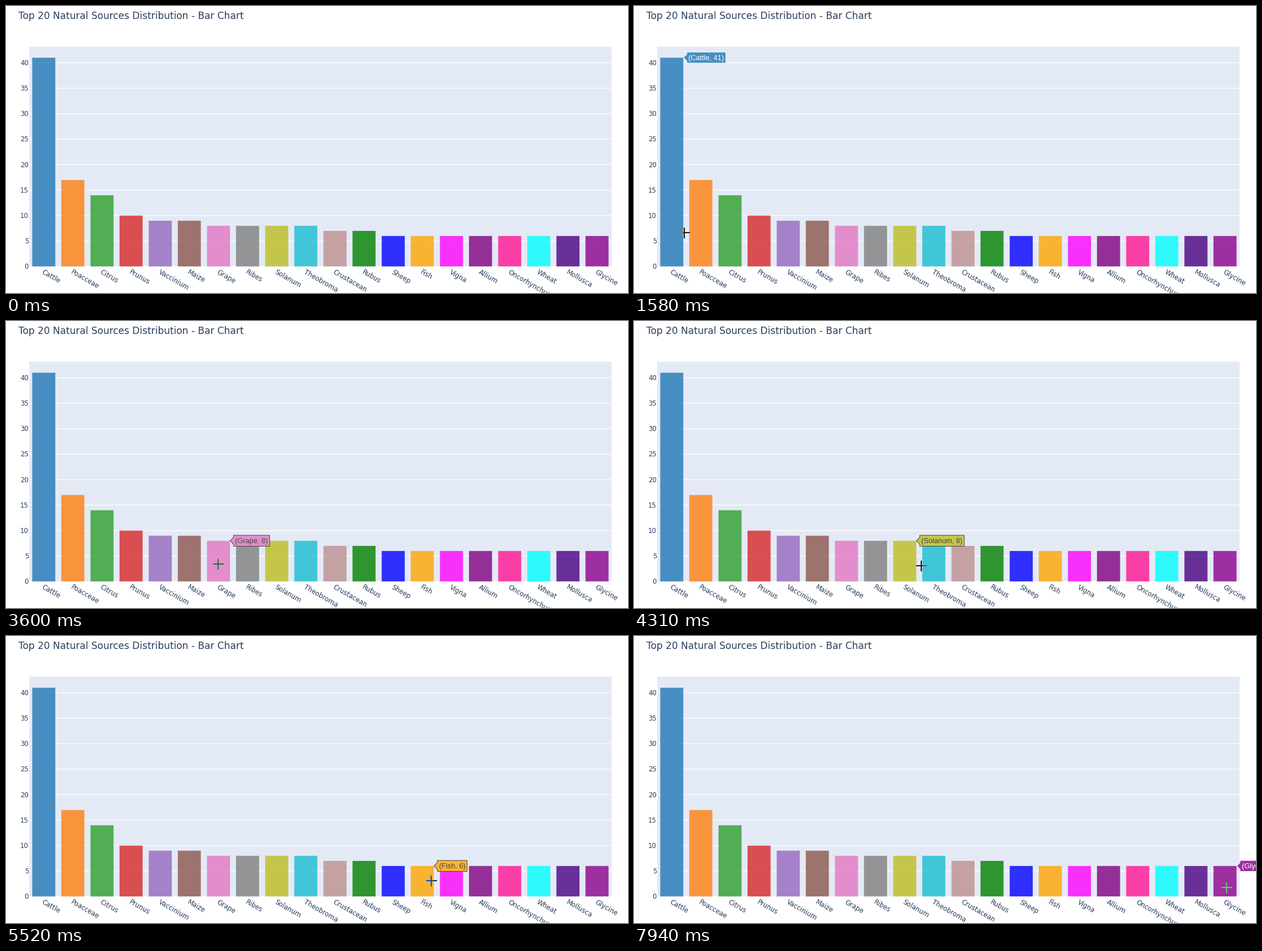
These frames come from a looping animation (1100 px wide and 509 px high, 8 s). A matplotlib script:

```python
import numpy as np
import matplotlib.pyplot as plt
from matplotlib.animation import FuncAnimation
from matplotlib.colors import to_rgb
from matplotlib.patches import Polygon, Rectangle

W, H, DPI = 1100, 509, 100
LOOP, STEP = 8000, 20
LEFT, RIGHT, TOP, BOTTOM = 41, 1071, 72, 462
INK, PLOT_BG = "#2a3f5f", "#e4eaf5"

NAMES = """Cattle Poacceae Citrus Prunus Vaccinium Maize Grape Ribes Solanum
    Theobroma Crustacean Rubus Sheep Fish Vigna Allium Oncorhynchus Wheat
    Mollusca Glycine""".split()
VALUES = [41, 17, 14, 10] + [9] * 2 + [8] * 4 + [7] * 2 + [6] * 8
COLORS = [f"C{k}" for k in range(10)] + """rosybrown green blue orange magenta
    purple deeppink cyan indigo darkmagenta""".split()

PITCH = (RIGHT - LEFT) / len(NAMES)
BAR_W = 0.8 * PITCH
BAR_X0 = LEFT + 0.1 * PITCH
UNIT = (BOTTOM - TOP) * 0.95 / max(VALUES)

# Pointer moves: start and end in ms, then the point reached
ENTRY = (950, 500)
MOVES = [
    (140, 380, (294, 365)),
    (620, 1130, (134, 364)),
    (1130, 1400, (46, 393)),
    (1400, 2150, (167, 419)),
    (2420, 2700, (268, 428)),
    (3050, 4310, (508, 434)),
    (4310, 5510, (752, 434)),
    (5930, 6730, (872, 443)),
    (6730, 7930, (1048, 446)),
]
HOVER_LAG = 30


def pt(px):
    return px * 72 / DPI


def value_y(value):
    return BOTTOM - value * UNIT


def blend(color):
    return 0.8 * np.array(to_rgb(color)) + 0.2 * np.array(to_rgb(PLOT_BG))


def contrast(rgb):
    return "white" if np.dot(rgb, (299, 587, 114)) * 0.255 < 128 else "#444444"


def pointer(t):
    """Steady on the way through a point, slowing down before a rest."""
    pos = np.array(ENTRY, float)
    next_starts = [move[0] for move in MOVES[1:]] + [LOOP]
    for (start, end, goal), following in zip(MOVES, next_starts):
        u = np.clip((t - start) / (end - start), 0, 1)
        power = 1 if following == end else 1.5
        pos += (np.array(goal) - pos) * (1 - (1 - u) ** power)
    return pos


def bar_index(x):
    return int(np.clip((x - BAR_X0) // PITCH, 0, len(NAMES) - 1))


fig = plt.figure(figsize=(W / DPI, H / DPI), dpi=DPI, facecolor="white")
ax = fig.add_axes([0, 0, 1, 1])
ax.set(xlim=(0, W), ylim=(H, 0))
ax.axis("off")


def text(x, y, s, px, color=INK, **kw):
    kw = {"family": "DejaVu Sans", "va": "baseline", **kw}
    return ax.text(x, y, s, fontsize=pt(px), color=color, **kw)


ax.add_patch(Rectangle((LEFT, TOP), RIGHT - LEFT, BOTTOM - TOP, fc=PLOT_BG, lw=0))
text(22, 23, "Top 20 Natural Sources Distribution - Bar Chart", 16.95)

for value in range(0, 41, 5):
    y = value_y(value)
    ax.plot([LEFT, RIGHT], [y, y], color="white", lw=pt(1.2), zorder=1,
            solid_capstyle="butt", snap=False)
    text(40, y + 4.3, str(value), 11.8, ha="right")

bars = []
for i, (name, value, color) in enumerate(zip(NAMES, VALUES, COLORS)):
    x = BAR_X0 + i * PITCH
    bars.append(ax.add_patch(Rectangle(
        (x, value_y(value)), BAR_W, value * UNIT, fc=color, ec=PLOT_BG,
        lw=pt(0.5), alpha=0.8, zorder=2, snap=False)))
    text(x + BAR_W / 2 - 4.2, 474, name, 11.8, rotation=-30,
         rotation_mode="anchor", ha="left")

tip_box = ax.add_patch(Polygon([(0, 0), (1, 0), (1, 1)], lw=pt(1), zorder=4,
                               joinstyle="miter"))
tip_text = text(0, 0, "", 12.75, family="Liberation Sans", zorder=5)


def make_cross():
    line, = ax.plot([], [], lw=pt(2), solid_capstyle="butt", zorder=6)
    return line


# The crosshair inverts what lies beneath: plain ground, then up to two bars
cross = make_cross()
cross.set_color(1 - np.array(to_rgb(PLOT_BG)))
bar_crosses = [make_cross(), make_cross()]


def show_tip(k):
    fill = blend(COLORS[k])
    x, y = BAR_X0 + k * PITCH + BAR_W, value_y(VALUES[k])
    tip_text.set(text=f"({NAMES[k]}, {VALUES[k]})", position=(x + 8.9, y + 4.4),
                 color=contrast(fill))
    a, b = x + 5.9, x + 11.8 + tip_text.get_window_extent().width
    h = 9.7
    tip_box.set_xy([(x, y), (a, y - 5.9), (a, y - h), (b, y - h),
                    (b, y + h), (a, y + h), (a, y + 5.9)])
    tip_box.set(facecolor=fill, edgecolor=contrast(fill))


def update(frame):
    t = frame * STEP + STEP / 2
    active = t >= MOVES[0][0]
    x, y = np.round(pointer(t))
    r = 9.5
    xs = [x - r, x + r, np.nan, x, x]
    ys = [y, y, np.nan, y - r, y + r]
    for line in (cross, *bar_crosses):
        line.set_data(xs, ys)
        line.set_visible(active)
    for line, edge in zip(bar_crosses, (x - r, x + r)):
        k = bar_index(edge)
        line.set_color(1 - blend(COLORS[k]))
        line.set_clip_path(bars[k])

    hover_x, hover_y = pointer(t - HOVER_LAG)
    k = bar_index(hover_x)
    hovering = active and value_y(VALUES[k]) < hover_y < BOTTOM
    tip_box.set_visible(hovering)
    tip_text.set_visible(hovering)
    if hovering:
        show_tip(k)
    return [cross, *bar_crosses, tip_box, tip_text]


anim = FuncAnimation(fig, update, frames=LOOP // STEP, interval=STEP, repeat=True)
plt.show()
```
